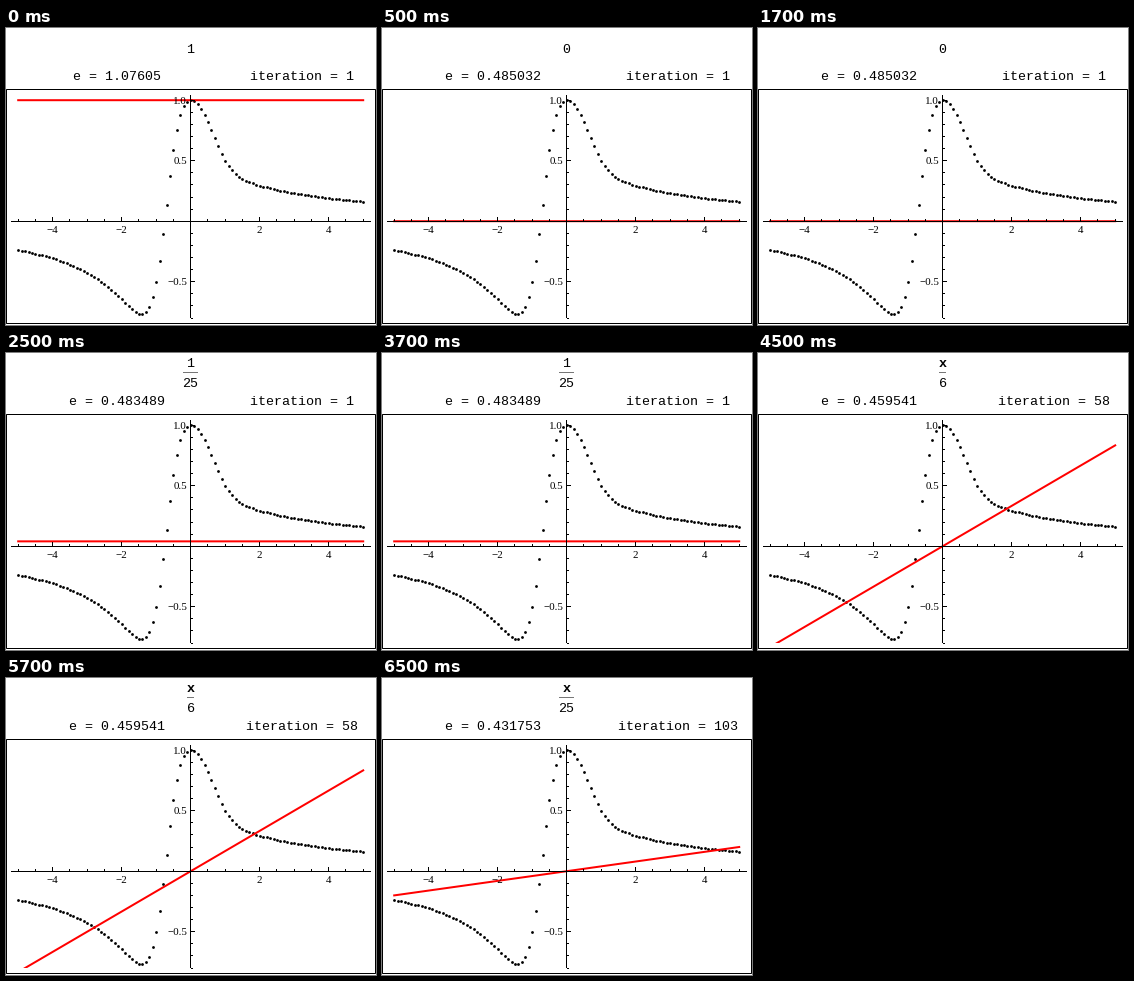
Animation, 370 px wide and 297 px high, one loop 8000 ms. Source, as a matplotlib script:

```python
import numpy as np
import matplotlib.pyplot as plt
from matplotlib.animation import FuncAnimation
from matplotlib.patches import Rectangle

W, H, DPI = 370, 297, 100
PX = 72 / DPI                  # points per pixel
X0, Y0 = 184.7, 193.2          # pixel position of the origin
SX, SY = 34.5, 121             # pixels per unit
TOP, BOTTOM = 67, 290          # vertical extent of the plot region
STEP_MS, LOOP_MS = 500, 8000

# start (ms), slope, offset, numerator, denominator, error, iteration
STATES = [
    (0, 0, 1, "1", "", "1.07605", 1),
    (500, 0, 0, "0", "", "0.485032", 1),
    (2500, 0, 1 / 25, "1", "25", "0.483489", 1),
    (4500, 1 / 6, 0, "x", "6", "0.459541", 58),
    (6500, 1 / 25, 0, "x", "25", "0.431753", 103),
]


def px(x):
    return X0 + SX * x


def py(y):
    return Y0 - SY * y


def pixel_center(v):
    return np.floor(v) + 0.5


def target(x):
    return (x**3 - x**2 + 1) / (x**4 + 1)


fig = plt.figure(figsize=(W / DPI, H / DPI), dpi=DPI, facecolor="white")
ax = fig.add_axes([0, 0, 1, 1])
ax.set_xlim(0, W)
ax.set_ylim(H, 0)
ax.axis("off")


def segment(xs, ys, color="black"):
    return ax.plot(xs, ys, color=color, lw=PX, solid_capstyle="butt",
                   snap=False, zorder=4)[0]


def label(x, y, text="", size=13.33, font="Liberation Mono", ha="center"):
    return ax.text(x, y, text, fontsize=size * PX, family=font,
                   ha=ha, va="baseline", zorder=5)


def draw_axes():
    ax.add_patch(Rectangle((0.5, 61.5), 369, 234, fill=False, ec="black",
                           lw=PX, snap=False))
    axis_x, axis_y = pixel_center(X0), pixel_center(Y0)
    segment([5, 365], [axis_y, axis_y])
    segment([axis_x, axis_x], [TOP, BOTTOM])
    for i in range(-10, 11):
        x, major = pixel_center(px(i / 2)), i % 4 == 0
        segment([x, x], [193, 189 if major else 191])
        if major and i:
            label(x, 205, f"{i // 2}".replace("-", "\u2212"), 11, "Liberation Serif")
    for i in range(-8, 11):
        y, major = pixel_center(py(i / 10)), i % 5 == 0
        segment([185, 189 if major else 187], [y, y])
        if major and i:
            label(181, y + 3.5, f"{i / 10:.1f}".replace("-", "\u2212"), 11,
                  "Liberation Serif", "right")


draw_axes()
xs = np.linspace(-5, 5, 101)
ax.plot(px(xs), py(target(xs)), "o", color="black", ms=2.8 * PX, mew=0,
        snap=False, zorder=2)

clip = Rectangle((0, TOP), W, BOTTOM - TOP, transform=ax.transData)
ends = np.array([-5, 5])
fit, = ax.plot([], [], color="red", lw=2 * PX, snap=False, zorder=3)
fit.set_clip_path(clip)

numerator = label(184.5, 14)
denominator = label(184.5, 34)
bar = segment([], [], "#777777")
error = label(111, 52)
iteration = label(296, 52)


def update(frame):
    now = frame * STEP_MS
    _, slope, offset, num, den, err, count = [s for s in STATES if s[0] <= now][-1]
    fit.set_data(px(ends), py(slope * ends + offset))
    numerator.set_text(num)
    numerator.set_y(14 if den else 25)
    numerator.set_weight("bold" if num == "x" else "normal")
    denominator.set_text(den)
    half = 4 * len(den) - 0.5
    bar.set_data([184.5 - half, 184.5 + half] if den else [],
                 [19.5, 19.5] if den else [])
    error.set_text(f"e = {err}")
    iteration.set_text(f"iteration = {count}")
    return fit, numerator, denominator, bar, error, iteration


anim = FuncAnimation(fig, update, frames=LOOP_MS // STEP_MS, interval=STEP_MS,
                     repeat=True, repeat_delay=0)
plt.show()
```
